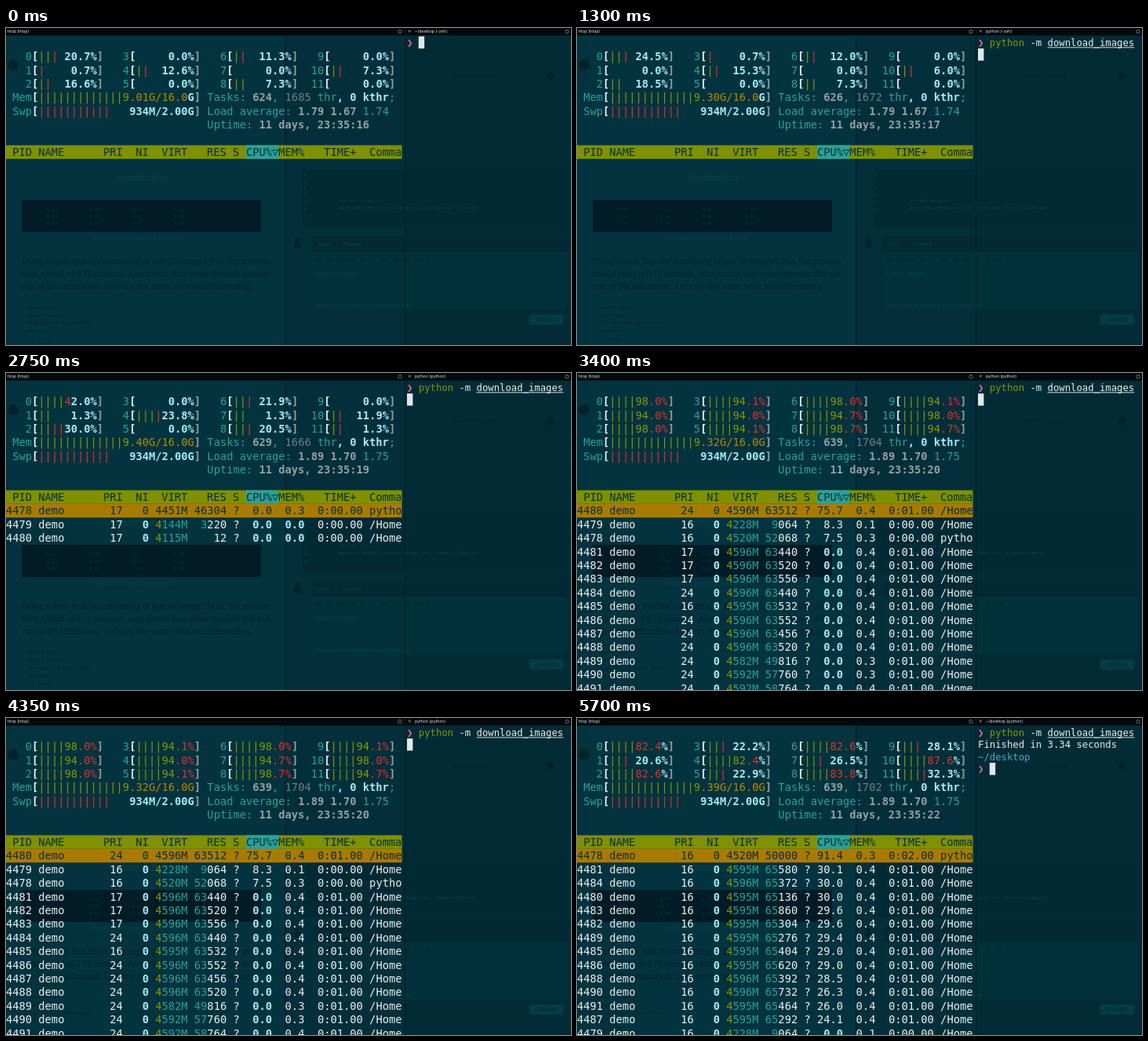
These frames come from a looping animation (720 by 404 pixels, 5750 ms). An HTML page with a canvas:

```html
<!DOCTYPE html>
<html lang="en">
<head>
<meta charset="utf-8">
<title>Process monitor next to a shell</title>
<style>
html, body { margin: 0; width: 100%; height: 100%; overflow: hidden; background: #022f3a; }
canvas { display: block; width: 720px; height: 404px; }
</style>
</head>
<body>
<canvas id="stage" width="720" height="404"></canvas>
<script>
const LOOP = 5750;
const ctx = document.getElementById('stage').getContext('2d');

const C = {
  g: '#859900', r: '#dc322f', y: '#b58900', c: '#2aa198', w: '#e9f1f0',
  b: '#a5ecf5', a: '#93a1a1', d: '#6b7f83', k: '#05303b', p: '#ef6d98', u: '#47a9c9'
};
const MONO = '"DejaVu Sans Mono", monospace';
const SANS = 'Inter, sans-serif';

// Terminal grids: origin, cell size and baseline offset
const monitor = { x: 0, y: 27.6, w: 8.27, h: 17.4, base: 13.6 };
const shell = { x: 511, y: 10.6, w: 7.38, h: 15.5, base: 12.2 };

// Monitor refreshes. Cores: load, then the colours of the filled cells.
// Rows: pid, res, cpu, virt, pri, mem, seconds; gaps and "-" take the defaults.
const samples = [
  { at: 0, sec: 16, tasks: 624, threads: 1685, mem: '9.01', load: ['1.79', '1.67', '1.74'],
    cores: '20.7ggr 0.7r 16.6gr 0.0 12.6gr 0.0 11.3gr 0.0 7.3gg 0.0 7.3gr 0.0', rows: '' },
  { at: 250, sec: 17, tasks: 626, threads: 1672, mem: '9.30', load: ['1.79', '1.67', '1.74'],
    cores: '24.5ggr 0.0 18.5gg 0.7r 15.3gr 0.0 12.0gr 0.0 7.3gg 0.0 6.0gr 0.0', rows: '' },
  { at: 1800, sec: 19, tasks: 629, threads: 1666, mem: '9.40', load: ['1.89', '1.70', '1.75'],
    cores: '42.0ggggr 1.3gg 30.0ggrr 0.0 23.8gggr 0.0 21.9ggr 1.3gg 20.5ggr 0.0 11.9gr 1.3gr',
    defaults: '0.0 4451M 17 0.0 0',
    rows: '4478 46304 - - - 0.3|4479 3220 - 4144M|4480 12 - 4115M' },
  { at: 3300, sec: 20, tasks: 639, threads: 1704, mem: '9.32', load: ['1.89', '1.70', '1.75'],
    cores: '98.0 94.0 98.0 94.1 94.0 94.1 98.0 94.7 98.7 94.1 98.0 94.7'.replace(/\d+\.\d/g, '$&ggggggrrr'),
    defaults: '0.0 4596M 24 0.4 1',
    rows: '4480 63512 75.7|4479 9064 8.3 4228M 16 0.1 0|4478 52068 7.5 4520M 16 0.3 0|' +
      '4481 63440 - - 17|4482 63520 - - 17|4483 63556 - - 17|4484 63440|4485 63532 - 4595M 16|' +
      '4486 63552|4487 63456|4488 63520|4489 49816 - 4582M - 0.3|4490 57760 - 4592M - 0.3|4491 58764 - 4592M' },
  { at: 4800, sec: 22, tasks: 639, threads: 1702, mem: '9.39', load: ['1.89', '1.70', '1.75'],
    cores: '82.4ggggrrrr 20.6ggr 82.6ggggrrrr 22.2ggr 82.4ggggggrr 22.9ggr ' +
      '82.6ggggrrrr 26.5ggr 83.8ggggrrrr 28.1ggr 87.6ggggrrrr 32.3gggr',
    defaults: '0.0 4595M 16 0.4 1',
    rows: '4478 50000 91.4 4520M - 0.3 2|4481 65580 30.1|4484 65372 30.0 4596M|4480 65136 30.0|' +
      '4483 65860 29.6|4482 65304 29.6|4489 65276 29.4|4485 65404 29.0|4486 65620 29.0|' +
      '4488 65392 28.5 4596M|4490 65732 26.3 4596M|4491 65464 26.0|4487 65292 24.1|4479 9064 - 4228M - 0.1 0' }
];

// Shell events
const RECALL = 50, ENTER = 1100, RUN = 1600, DONE = 5350;

function box(x, y, w, h, color) {
  ctx.fillStyle = color;
  ctx.fillRect(x, y, w, h);
}

function label(text, x, y, color, font) {
  ctx.font = font;
  ctx.fillStyle = color;
  ctx.fillText(text, x, y);
}

function dot(x, y, radius, color, hollow) {
  ctx.beginPath();
  ctx.arc(x, y, radius, 0, 7);
  ctx.fillStyle = ctx.strokeStyle = color;
  ctx.lineWidth = 0.7;
  hollow ? ctx.stroke() : ctx.fill();
}

function cells(grid, col, row, n, color) {
  box(grid.x + col * grid.w, grid.y + row * grid.h, n * grid.w, grid.h, color);
}

// Writes [text, colour, bold] runs one after another
function put(grid, col, row, ...runs) {
  for (const [text, color, bold] of runs) {
    label(text, grid.x + col * grid.w, grid.y + row * grid.h + grid.base, C[color],
      `${bold ? 'bold ' : ''}${grid.w / 0.602}px ${MONO}`);
    col += text.length;
  }
}

// Bar cells show a stroke where blank; the figure takes the bar colour where covered
function meter(col, row, name, text, width, fill) {
  put(monitor, col - name.length, row, [name, 'c'], ['[', 'w', 1]);
  [...text.padStart(width)].forEach((ch, i) => {
    const hue = fill[i];
    put(monitor, col + 1 + i, row, hue ? [ch === ' ' ? '|' : ch, hue] : [ch, 'b', 1]);
  });
  put(monitor, col + 1 + width, row, [']', 'a', 1]);
}

// Faint web page showing through the terminal
function drawPage() {
  box(0, 0, 720, 404, '#022f3a');
  box(0, 10, 357, 394, '#03333e');
  box(355, 10, 3, 394, '#022833');
  box(362, 85, 143, 319, '#032f3a');
  box(509, 10, 211, 394, '#022b36');
  box(20, 219, 305, 41, '#021c27');
  box(378, 180, 337, 74, '#022a35');
  box(390, 265, 325, 95, '#02303b');
  box(390, 265, 325, 20, '#022934');
  box(667, 365, 43, 13, '#033d45');

  const ink = '#02232d', pale = '#0b424c';
  dot(9, 47, 7, ink);
  dot(694, 61, 5, ink);
  dot(371, 270, 3, ink);
  box(367, 273, 9, 7, ink);
  const small = `6px ${SANS}`, body = '10.2px "Noto Serif", serif', code = `5.5px ${MONO}`;
  label('Downloading the images one at a time', 110, 270, pale, small);
  label('Running the script now', 141, 192, pale, small);
  box(141, 193.5, 63, 0.6, pale);
  label('Using a web_link.list consisting of just 80 image URLs, the process', 20, 301, ink, body);
  label('took a total of 5.71 seconds. Also notice that other threads did not', 20, 317, ink, body);
  label('run at 0% utilization. Let\'s try the same with multithreading.', 20, 333, ink, body);
  ['import time', 'import queue', 'from pathlib import Path', 'def main():', '    run()'].forEach((s, i) =>
    label(s, 28, 358 + i * 10, ink, code));
  for (let i = 0; i < 12; i++) label('0.0%', 52 + i % 4 * 54, 233 + (i >> 2) * 9, '#06303a', code);
  label('Dive into threading', 570, 63, ink, small);
  label('for url in urls:', 424, 222, pale, code);
  label('executor.submit(download_image, url, timeout=timeout)', 424, 231, pale, code);
  for (let i = 0; i < 7; i++) label(i + 1, 379, 188 + i * 9, pale, code);
  label('Write', 397, 278, pale, small);
  label('Preview', 430, 278, pale, small);
  for (let i = 0; i < 11; i++) dot(398 + i * 14, 295, 2, ink, true);
  label('Leave a comment', 395, 315, pale, small);
  label('Attach files by dragging and dropping here', 395, 356, pale, small);
  label('Comment', 675, 373.5, ink, small);
}

function drawTitles(t) {
  box(0, 0, 720, 9.5, '#05090b');
  box(508, 0, 1, 404, '#0a1a20');
  const font = `5.2px ${SANS}`;
  const title = t < ENTER ? '~/desktop (-zsh)' : t < RUN ? 'python (-zsh)'
    : t < DONE ? 'python (python)' : '~/desktop (python)';
  label('htop (htop)', 2, 6.4, '#e4e8e8', font);
  label(title, 521, 6.4, '#e4e8e8', font);
  label('✕', 512, 6.4, '#a9b2b4', '5.5px "DejaVu Sans", sans-serif');
  for (const x of [502, 715]) dot(x, 4.6, 2.2, '#909a9c', true);
}

function drawRow(line, i, defaults) {
  const [pid, res, ...given] = line.split(' ');
  const [cpu, virt, pri, mem, sec] = defaults.split(' ').map((v, n) =>
    given[n] && given[n] !== '-' ? given[n] : v);
  const row = 8 + i, picked = i === 0;
  if (picked) cells(monitor, 0, row, 61, '#a87b00');
  const at = (col, ...runs) => put(monitor, col, row, ...runs.map(r => picked ? [r[0], 'k'] : r));
  const tint = v => v === '0.0' ? [v, 'b', 1] : [v, 'w'];
  const big = Math.max(0, res.length - 3);
  at(0, [pid, 'w']);
  at(5, ['demo', 'w']);
  at(16, [pri, 'w']);
  at(21, ['0', 'b', 1]);
  at(23, [virt[0], 'g'], [virt.slice(1), 'c']);
  at(34 - res.length, [res.slice(0, big), 'c'], [res.slice(big), 'w']);
  at(35, ['?', 'w']);
  at(41 - cpu.length, tint(cpu));
  at(43, tint(mem));
  at(48, [`0:0${sec}.00`, 'w']);
  at(56, [pid === '4478' ? 'pytho' : '/Home', 'w']);
}

function drawMonitor(t) {
  const s = samples.findLast(v => v.at <= t);
  s.cores.split(' ').forEach((core, i) => {
    const [, load, fill] = core.match(/([\d.]+)(\w*)/);
    meter(4 + 15 * Math.floor(i / 3), i % 3, String(i), load + '%', 9, fill);
  });
  const used = 'g'.repeat(14) + 'y'.repeat(s.sec < 19 ? 9 : 10);
  meter(4, 3, 'Mem', s.mem + 'G/16.0G', 24, used);
  meter(4, 4, 'Swp', '934M/2.00G', 24, 'r'.repeat(11));
  put(monitor, 31, 3, ['Tasks: ', 'c'], [String(s.tasks), 'a', 1], [', ', 'c'], [String(s.threads), 'd'],
    [' thr', 'c'], [', 0 kthr', 'b', 1], [';', 'c']);
  put(monitor, 31, 4, ['Load average: ', 'c'], [s.load[0] + ' ', 'a', 1], [s.load[1] + ' ', 'a', 1], [s.load[2], 'c']);
  put(monitor, 31, 5, ['Uptime: ', 'c'], ['11 days, 23:35:' + s.sec, 'a', 1]);

  cells(monitor, 0, 7, 61, '#7f9000');
  cells(monitor, 37, 7, 5, C.c);
  put(monitor, 0, 7, [' PID NAME      PRI  NI  VIRT   RES S ', 'k'], ['CPU%▽', 'k'], ['MEM%   TIME+  Comma', 'k']);
  if (s.rows) s.rows.split('|').forEach((line, i) => drawRow(line, i, s.defaults));
}

function drawShell(t) {
  const cursor = t < RECALL ? [2, 0] : t < ENTER ? [27, 0] : t < DONE ? [0, 1] : [2, 3];
  put(shell, 0, 0, ['❯', 'p', 1]);
  if (t >= RECALL) {
    put(shell, 2, 0, ['python', 'g'], [' -m ', 'w'], ['download_images', 'w']);
    box(shell.x + 12 * shell.w, 24.4, 15 * shell.w, 0.9, C.w);
  }
  if (t >= DONE) {
    put(shell, 0, 1, ['Finished in 3.34 seconds', 'w']);
    put(shell, 0, 2, ['~/desktop', 'u']);
    put(shell, 0, 3, ['❯', 'p', 1]);
  }
  cells(shell, ...cursor, 1, '#dfe8e8');
}

function frame(now) {
  const t = now % LOOP;
  drawPage();
  drawTitles(t);
  drawMonitor(t);
  drawShell(t);
  requestAnimationFrame(frame);
}
requestAnimationFrame(frame);
</script>
</body>
</html>
```
